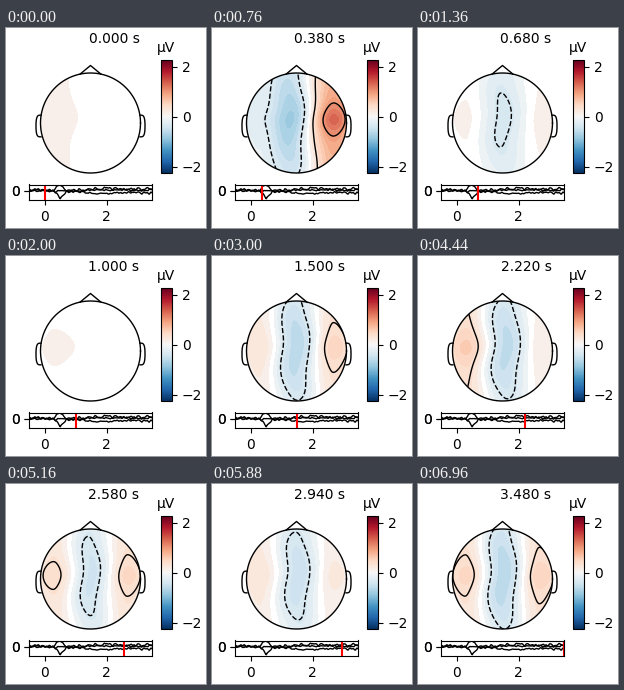
These frames come from a looping animation (200 px wide and 200 px high, 7 s). A matplotlib script:

```python
import numpy as np
import matplotlib.pyplot as plt
from matplotlib.animation import FuncAnimation
from matplotlib.cm import ScalarMappable
from matplotlib.colors import ListedColormap, Normalize
from matplotlib.patches import Circle

SIZE, DPI = 200, 100
FRAMES, STEP = 175, 0.02
CX, CY, R = 84.5, 95, 50
REACH = 37  # distance between neighbouring sensors
VMAX = 2.26
LEVELS = np.linspace(-VMAX, VMAX, 7, endpoint=False)[1:]

plt.rcParams.update({"font.family": "DejaVu Sans", "font.size": 10})

# time: potential at the left, middle and right sensor
POSES = {
    0.0: (0.16, -0.03, 0),
    0.3: (0, -0.1, 0.1),
    0.38: (-0.28, -0.62, 1.28),
    0.5: (0.1, -2.2, 1.65),
    0.7: (0, 0, 0),
    1.0: (0.08, 0.02, 0),
    1.5: (0.28, -0.6, 0.49),
    2.22: (0.57, -0.56, 0.14),
    2.94: (0.28, -0.48, 0.22),
    3.48: (0.46, -0.62, 0.51),
}


# --- signals ---------------------------------------------------------------
times = np.arange(-25, FRAMES) * STEP
keys = np.array(list(POSES))


def signal(values, rng):
    """Line through the key poses with smooth noise that rests on each of them."""
    noise = np.convolve(rng.normal(size=len(times) + 4), np.hanning(7)[1:-1], "valid")
    noise *= 0.18 / noise.std()
    noise -= np.interp(times, keys, np.interp(keys, times, noise))
    return np.interp(times, keys, values) + noise


rng = np.random.default_rng(4)
signals = np.array([signal(v, rng) for v in zip(*POSES.values())])


# --- scalp field -----------------------------------------------------------
def hermite(t, a, b, da, db):
    s = t * t * (3 - 2 * t)
    return a + (b - a) * s + t * (1 - t) * ((1 - t) * da - t * db)


xs = np.linspace(CX - R - 1, CX + R + 1, 103)
ys = np.linspace(CY - R - 1, CY + R + 1, 103)
gx, gy = np.meshgrid(xs, ys)
u = (gx - CX) / REACH
u -= 0.06 * np.cos((gy - 85) * np.pi / 30) * np.exp(-2 * u ** 2)
t = np.clip(np.abs(u), 0, 1)
rim = 1 - 2.5 * np.clip(np.abs(u) - 1, 0, None) ** 2
side_fade = 0.5 + 0.5 / (1 + ((gy - 91.5) / 17) ** 2)
mid_fade = 1 - 0.36 * ((gy - 92) / 46) ** 2


def field(left, mid, right):
    left, mid, right = left * side_fade, mid * mid_fade, right * side_fade
    slope = right - left
    west = hermite(t, mid, left, -slope, 0)
    east = hermite(t, mid, right, slope, 0)
    return np.where(u < 0, west, east) * rim


# --- stage -----------------------------------------------------------------
def box(x0, y0, x1, y1):
    return fig.add_axes([x0 / SIZE, 1 - y1 / SIZE, (x1 - x0) / SIZE, (y1 - y0) / SIZE])


fig = plt.figure(figsize=(SIZE / DPI, SIZE / DPI), dpi=DPI, facecolor="white")
ax = box(0, 0, SIZE, SIZE)
ax.set(xlim=(0, SIZE), ylim=(SIZE, 0))
ax.axis("off")

# banded map with a white middle step
bands = plt.get_cmap("RdBu_r")(np.linspace(0, 1, 39))
bands[19] = 1
head = Circle((CX, CY), R, transform=ax.transData)
im = ax.imshow(np.zeros_like(gx), cmap=ListedColormap(bands), vmin=-VMAX, vmax=VMAX,
               extent=(xs[0], xs[-1], ys[-1], ys[0]), interpolation="bilinear",
               aspect="auto", zorder=1)
im.set_clip_path(head)


def outline(x, y):
    ax.plot(CX + R * np.asarray(x), CY - R * np.asarray(y), "k", lw=1, zorder=4)


turn = np.linspace(0, 2 * np.pi, 101)
outline(np.cos(turn), np.sin(turn))
outline([-0.208, 0, 0.208], [0.978, 1.15, 0.978])

half = np.linspace(-np.pi / 2, np.pi / 2, 41)
ear_x = 0.99 + 0.1 * np.sqrt(np.abs(np.cos(half)))
ear_y = -0.06 + 0.217 * np.sign(half) * np.abs(np.sin(half)) ** 0.8
outline(ear_x, ear_y)
outline(-ear_x, ear_y)

clock = ax.text(108, 15, "", ha="center", va="baseline")

cax = box(155, 32, 166, 145)
fig.colorbar(ScalarMappable(Normalize(-VMAX, VMAX), "RdBu_r"), cax=cax, ticks=[-2, 0, 2])
cax.set_title("µV", fontsize=10)

trace = box(23.3, 156.5, 146.3, 172)
trace.plot(times, signals.T, "k", lw=1)
trace.set(xlim=(-0.5, 3.48), ylim=(-2.55, 1.8), xticks=[0, 2], yticks=[0, 0.04])
trace.set_yticklabels(["0", "0"])
cursor = trace.axvline(0, color="r", lw=1.5, zorder=2.2)

contours = []


def draw(i):
    while contours:
        contours.pop().remove()
    z = field(*signals[:, i + 25])
    im.set_data(z)
    shown = [v for v in LEVELS if z.min() < v < z.max()]
    if shown:
        lines = ax.contour(xs, ys, z, levels=shown, colors="k", linewidths=1, zorder=3)
        lines.set_clip_path(head)
        contours.append(lines)
    now = i * STEP
    cursor.set_xdata([now, now])
    clock.set_text(f"{now:.3f} s")
    return []


anim = FuncAnimation(fig, draw, frames=FRAMES, init_func=lambda: draw(0),
                     interval=40, repeat=True, repeat_delay=0, blit=False)
plt.show()
```
